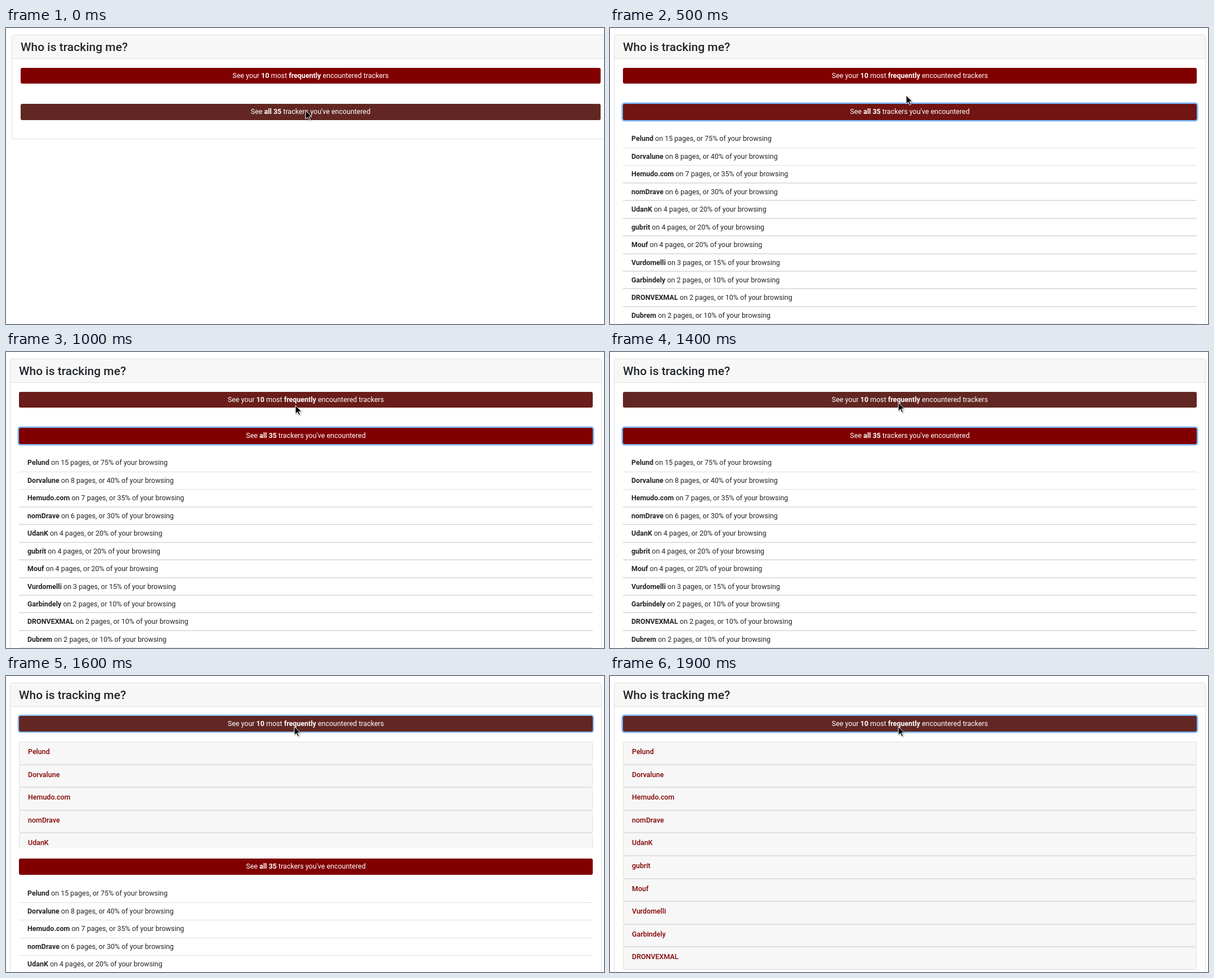
Recreate the animation shown at these times as an HTML page. Size 1062 by 527 pixels, loop 2 s.

```html
<!DOCTYPE html>
<html lang="en">
<head>
<meta charset="utf-8">
<title>Who is tracking me?</title>
<style>
  html, body { margin: 0; width: 100%; height: 100%; overflow: hidden; background: #fff; }
  body { position: relative; font: 12.47px Roboto, sans-serif; color: #212529; white-space: nowrap; }
  div, svg { position: absolute; box-sizing: border-box; }
  b { font-weight: 700; }
  #stage { left: 0; top: 0; width: 1062px; height: 527px; overflow: hidden; }
  #card { top: 12px; border: 1px solid #dfdfdf; border-radius: 3px; }
  #head { left: 0; right: 0; top: 0; height: 42px; background: #f7f7f7; border-bottom: 1px solid #dfdfdf; }
  #head div { left: 15px; top: 1px; font-size: 21px; font-weight: 500; line-height: 41px; }
  #body { top: 0; height: 527px; }
  .btn { left: 0; right: 0; height: 28.6px; border-radius: 3px; line-height: 28.6px; text-align: center; color: #fff; }
  #top { top: 70.6px; }
  #panel { left: 0; right: 0; top: 117.2px; overflow: hidden; }
  .item { left: 0; right: 0; background: #f7f7f7; border: 1px solid #dfdfdf; border-radius: 3px;
          padding-left: 15px; line-height: 34px; font-weight: 500; color: #800000; }
  #list { left: 0; right: 0; overflow: hidden; }
  .row { left: 15px; line-height: 31.4px; }
  .line { left: 0; right: 0; height: 1px; background: #dfdfdf; }
  .thick .line:nth-child(n + 5) { height: 2px; margin-top: -1px; }
  #cursor { left: 0; top: 0; overflow: visible; filter: drop-shadow(1px 1px 1px rgba(0,0,0,.35)); }
</style>
</head>
<body>
<div id="stage">
  <div id="card"><div id="head"><div>Who is tracking me?</div></div></div>
  <div id="body">
    <div class="btn" id="top">See your <b>10</b> most <b>frequently</b> encountered trackers</div>
    <div id="panel"></div>
    <div class="btn" id="all">See <b>all 35</b> trackers you've encountered</div>
    <div id="list"></div>
  </div>
  <svg id="cursor" width="12" height="19">
    <path d="M0 0V15.2L3.6 11.9L6.1 17.6L8.5 16.5L6 11H10.8Z" fill="#000" stroke="#fff" stroke-width="1"/>
  </svg>
</div>
<script>
const LOOP = 2000, STEP = 100, ROW = 31.45, ITEM = 40.56, ALL_TOP = 135.2, LIST_TOP = 181.4;

const trackers = [
  ['Pelund', 15, 75], ['Dorvalune', 8, 40], ['Hemudo.com', 7, 35], ['nomDrave', 6, 30],
  ['UdanK', 4, 20], ['gubrit', 4, 20], ['Mouf', 4, 20], ['Vurdomelli', 3, 15],
  ['Garbindely', 2, 10], ['DRONVEXMAL', 2, 10], ['Dubrem', 2, 10]
];

// Each track: [time in ms, value]
const tracks = {
  x: [[200, 532], [600, 524], [1000, 514], [1300, 512]],
  y: [[200, 147], [600, 111], [1000, 95], [1300, 90]],
  hoverTop: [[900, 0], [1000, .75], [1100, 1]],
  hoverAll: [[400, 1], [600, 0]],
  ringTop: [[1400, 0], [1500, .45], [1600, .9], [1700, 1]],
  ringAll: [[0, 0], [100, .45], [200, 1], [1400, 1], [1500, .55], [1600, 0]],
  list: [[0, 0], [100, 90], [200, 600]],
  panel: [[1400, 0], [1500, 34.6], [1600, 190], [1700, 316.6], [1800, 403.6], [1900, 405.6]]
};

const $ = id => document.getElementById(id);
const px = n => n + 'px';

function add(parent, cls, html, style) {
  const el = document.createElement('div');
  el.className = cls;
  el.innerHTML = html;
  Object.assign(el.style, style);
  parent.append(el);
}

trackers.forEach(([name, pages, share], i) => {
  add($('list'), 'row', `<b>${name}</b> on ${pages} pages, or ${share}% of your browsing`, { top: px(i * ROW) });
  add($('list'), 'line', '', { top: px((i + 1) * ROW) });
});

trackers.slice(0, 10).forEach(([name], i) => {
  add($('panel'), 'item', name, { top: px(i * ITEM), height: px(ITEM) });
});

function sample(track, t) {
  const i = track.findIndex(k => k[0] > t);
  if (i === 0) return track[0][1];
  if (i < 0) return track[track.length - 1][1];
  const [t0, a] = track[i - 1], [t1, b] = track[i];
  return a + (b - a) * (t - t0) / (t1 - t0);
}

function paintButton(el, hover, ring) {
  const mix = (a, b) => Math.round(a + (b - a) * hover);
  el.style.background = `rgb(${mix(128, 98)},${mix(0, 39)},${mix(0, 35)})`;
  el.style.boxShadow = ring ? `0 0 0 ${2.6 * ring}px rgba(0,123,255,${.5 * ring})` : 'none';
}

function render(t) {
  const v = {};
  for (const key in tracks) v[key] = sample(tracks[key], t);

  // The page narrows once the scrollbar appears
  const wide = t < 200, left = wide ? 10 : 7, width = wide ? 1062 : 1051;
  Object.assign($('card').style, { left: px(left), width: px(width), height: px(186 + v.list + v.panel) });
  Object.assign($('body').style, { left: px(left + 16), width: px(width - 32) });

  paintButton($('top'), v.hoverTop, v.ringTop);
  paintButton($('all'), v.hoverAll, v.ringAll);
  $('panel').style.height = px(v.panel);
  $('all').style.top = px(ALL_TOP + v.panel);
  Object.assign($('list').style, { top: px(LIST_TOP + v.panel), height: px(v.list) });
  $('list').classList.toggle('thick', t >= 200 && t < 1500);
  $('cursor').style.transform = `translate(${Math.round(v.x)}px,${Math.round(v.y)}px)`;
}

const start = performance.now();
let shown = -1;
function tick() {
  const t = Math.floor((performance.now() - start) % LOOP / STEP) * STEP;
  if (t !== shown) render(shown = t);
  requestAnimationFrame(tick);
}
tick();
</script>
</body>
</html>
```
